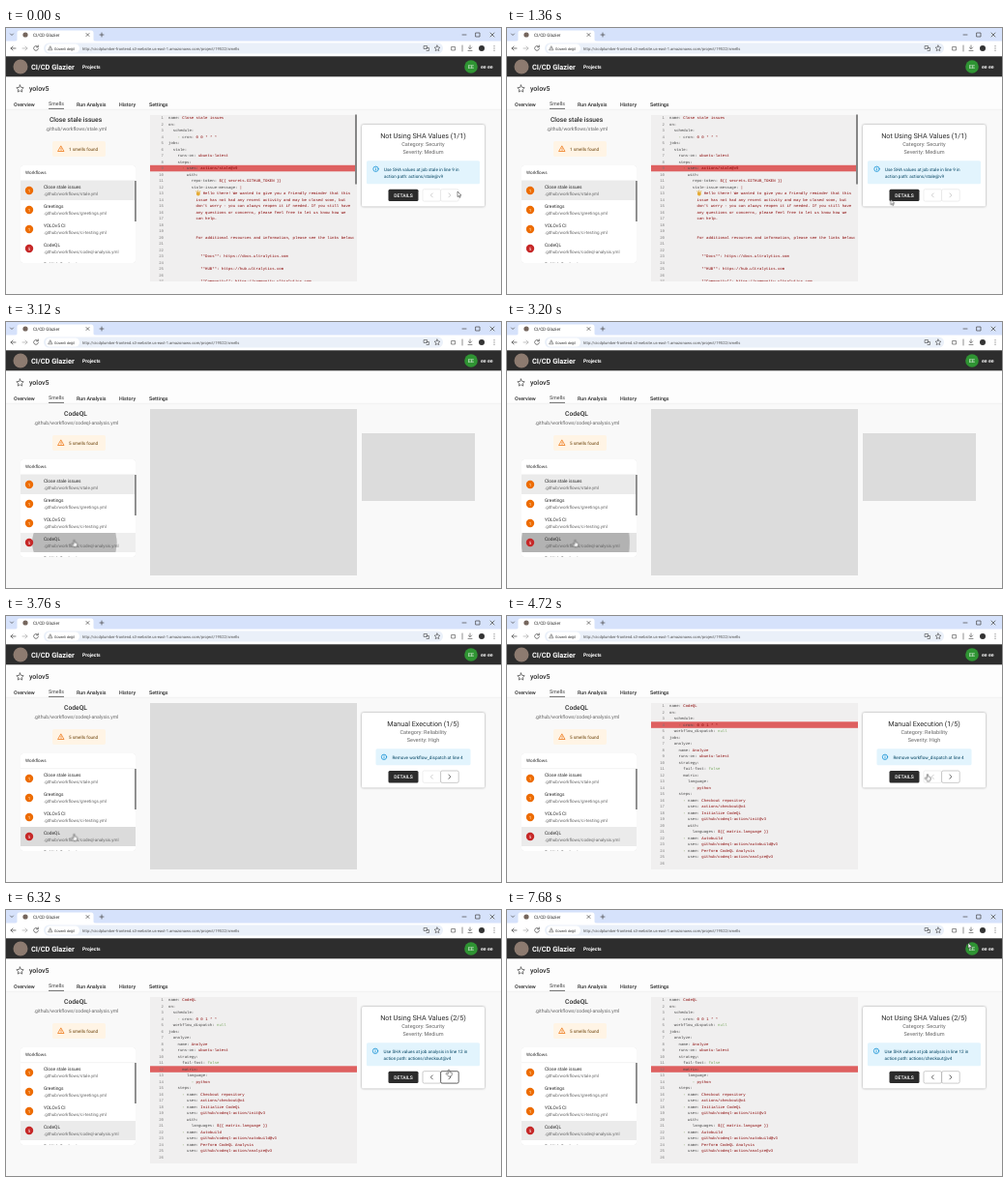
Animation, 512 px wide and 275 px high, one loop 7760 ms. Source, as an HTML page:

```html
<!DOCTYPE html>
<html lang="en">
<head>
<meta charset="utf-8">
<title>Workflow smells</title>
<style>
html, body { margin: 0; width: 100%; height: 100%; overflow: hidden; background: #f9f9f9; }
svg { display: block; width: 100vw; height: 100vh; }
text { font: 4.6px Roboto, "Open Sans", sans-serif; fill: #2b2b2b; white-space: pre; text-rendering: geometricPrecision; }
.mid { text-anchor: middle; }
.bold { font-weight: 500; }
.white { fill: #fff; }
.grey { fill: #666; }
.amber { fill: #663c00; }
.navy { fill: #014361; }
.line { fill: none; stroke: #444; stroke-width: .7; stroke-linecap: round; stroke-linejoin: round; }
.code text { font: 3.97px "Liberation Mono", "DejaVu Sans Mono", monospace; fill: #444; }
.code .num { fill: #777; text-anchor: end; }
.code .val { fill: #800; }
.code .lit { fill: #78a960; }
.code .dash { fill: #397300; }
.shadow { filter: drop-shadow(0 .8px .9px #0006); }

.cut { animation: 7.76s step-end infinite; }
.old { animation-name: old; }
.new { animation-name: new; }
.wait-card { animation-name: wait-card; }
.wait-code { animation-name: wait-code; }
.code-b { animation-name: code-b; }
.first { animation-name: first; }
.first-line { animation-name: first-line; }
.second { animation-name: second; }
.over3 { animation-name: over3; }
.over4 { animation-name: over4; }
.over-next { animation-name: over-next; }
.hand { animation-name: hand; }
.arrow { animation-name: arrow; }
@keyframes old { 0% { opacity: 1 } 40.1%, 100% { opacity: 0 } }
@keyframes new { 0% { opacity: 0 } 40.1%, 100% { opacity: 1 } }
@keyframes wait-card { 0% { opacity: 0 } 40.1% { opacity: 1 } 46.4%, 100% { opacity: 0 } }
@keyframes wait-code { 0% { opacity: 0 } 40.1% { opacity: 1 } 50.5%, 100% { opacity: 0 } }
@keyframes code-b { 0% { opacity: 0 } 50.5%, 100% { opacity: 1 } }
@keyframes first { 0% { opacity: 0 } 46.4% { opacity: 1 } 77.3%, 100% { opacity: 0 } }
@keyframes first-line { 0% { opacity: 0 } 50.5% { opacity: 1 } 77.3%, 100% { opacity: 0 } }
@keyframes second { 0% { opacity: 0 } 77.3%, 100% { opacity: 1 } }
@keyframes over3 { 0% { opacity: 0 } 28% { opacity: 1 } 32%, 100% { opacity: 0 } }
@keyframes over4 { 0% { opacity: 0 } 32% { opacity: 1 } 51.5%, 100% { opacity: 0 } }
@keyframes over-next { 0% { opacity: 0 } 70% { opacity: 1 } 85%, 100% { opacity: 0 } }
@keyframes hand { 0% { opacity: 0 } 28% { opacity: 1 } 51.5% { opacity: 0 } 58.8% { opacity: 1 } 85%, 100% { opacity: 0 } }
@keyframes arrow { 0% { opacity: 1 } 28% { opacity: 0 } 51.5% { opacity: 1 } 58.8% { opacity: 0 } 85%, 100% { opacity: 1 } }

.pointer { animation: travel 7.76s ease-in-out infinite; }
@keyframes travel {
  0%, 12% { transform: translate(467px, 169px) }
  30.9% { transform: translate(74px, 214.5px) }
  35%, 51% { transform: translate(70.5px, 225.5px) }
  59.8%, 66% { transform: translate(435px, 163.5px) }
  72%, 84% { transform: translate(458px, 165px) }
  95%, 100% { transform: translate(477px, 34px) }
}
.ripple { animation: ripple 7.76s linear infinite; transform-origin: 71px 228px; }
@keyframes ripple {
  0%, 37% { transform: scale(0); opacity: 0 }
  37.1% { transform: scale(.1); opacity: .22 }
  41.24% { transform: scale(1); opacity: .22 }
  42.5% { transform: scale(1.14); opacity: .18 }
  46%, 100% { transform: scale(1.14); opacity: 0 }
}
.leave { animation: leave 7.76s linear infinite; }
.enter { animation: enter 7.76s linear infinite; }
@keyframes leave { 0%, 41.3% { opacity: 1 } 43.3%, 100% { opacity: 0 } }
@keyframes enter { 0%, 40.2% { opacity: 0 } 42.2%, 100% { opacity: 1 } }
</style>
</head>
<body>
<svg viewBox="0 0 512 275" preserveAspectRatio="none">
  <defs>
    <clipPath id="list"><rect x="15" y="158" width="119" height="85"/></clipPath>
    <clipPath id="row4"><rect x="15" y="218" width="119" height="20"/></clipPath>
    <clipPath id="panel"><rect x="149" y="90" width="214" height="172"/></clipPath>
  </defs>

  <!-- browser -->
  <rect width="512" height="14" fill="#d6e2fb"/>
  <path d="M9 14q2.500 0 2.500-2.500V5q0-2.500 2.500-2.500h74q2.500 0 2.500 2.500v6.500q0 2.500 2.500 2.500z" fill="#fff"/>
  <path class="line" d="M4.500 6l1.500 1.500 1.500-1.500M83 5.500l3 3m0-3l-3 3M97 7h4m-2-2v4M472 7h4M486 5h4v4h-4zM501 5l4 4m0-4l-4 4"/>
  <circle cx="20" cy="7" r="2.6" fill="#75665d"/>
  <text x="28" y="8.800">CI/CD Glazier</text>
  <rect y="13.500" width="512" height="16" fill="#fff"/>
  <rect x="39" y="15.500" width="413" height="11" rx="5.500" fill="#eaf0f9"/>
  <rect x="41" y="16.500" width="35" height="9" rx="4.500" fill="#fff"/>
  <path class="line" d="M10 21H5m2-2l-2 2 2 2"/>
  <path class="line" d="M17 21h5m-2-2l2 2-2 2" style="stroke:#aaa"/>
  <path class="line" d="M33 19.500a2.400 2.400 0 1 0 .4 2M33.300 18v1.800h-1.800"/>
  <path class="line" d="M46 19l2 3.800h-4zM46 20.400v1.200" style="stroke-width:.5"/>
  <text x="50" y="22.500" style="font-size:3.7px">Güvenli değil</text>
  <text x="79" y="22.600" style="font-size:4.1px;fill:#505050">http://cicdplumber-frontend.s3-website.us-east-1.amazonaws.com/project/19522/smells</text>
  <path class="line" d="M432.500 18.500h3v3h-3zM435 20.500h2.500v3H435M446 18l.9 1.900 2 .3-1.500 1.400.4 2-1.800-1-1.800 1 .4-2-1.500-1.400 2-.3zM461 19.500h3.500v3.500H461zM472 18v6M480 18v3.500m-1.700-1.500l1.700 1.700 1.700-1.700M478 23.500h4" style="stroke-width:.6"/>
  <circle cx="492" cy="21" r="3" fill="#333"/>
  <path class="line" d="M505 18.800v.01m0 2.200v.01m0 2.200v.01" style="stroke-width:1"/>

  <!-- project header -->
  <rect y="50" width="512" height="34.500" fill="#fdfdfd"/>
  <path class="line" d="M14.500 59l1.100 2.400 2.600.3-1.900 1.800.5 2.600-2.300-1.300-2.300 1.300.5-2.600-1.900-1.800 2.600-.3z"/>
  <text x="24" y="65" class="bold" style="font-size:7px">yolov5</text>
  <g id="tabs"></g>
  <path d="M0 84.300h512" stroke="#e4e4e4" stroke-width=".5"/>
  <path d="M44 83.500h16" stroke="#555" stroke-width=".8"/>

  <!-- app header -->
  <rect y="29.300" width="512" height="21" fill="#2d2d2d"/>
  <circle cx="15" cy="40" r="7.500" fill="#8d7b70"/>
  <text x="26" y="42.600" class="white" style="font-size:7.4px;font-weight:700">CI/CD Glazier</text>
  <text x="79" y="42" class="white" style="font-size:5px;font-weight:700">Projects</text>
  <circle cx="481" cy="40" r="6.800" fill="#2f9433"/>
  <text x="481" y="41.900" class="mid white" style="font-size:5.4px">EE</text>
  <text x="491" y="42" class="white bold" style="font-size:5.3px">ee ee</text>

  <!-- left column -->
  <g id="heads"></g>
  <rect x="48" y="117" width="55" height="16" rx="2" fill="#fff4e5"/>
  <path class="line" d="M57 122.200l3 5.300h-6zM57 124.200v1.300m0 1v.01" style="stroke:#ed6c02"/>
  <text x="65" y="126.700" class="cut old amber">1 smells found</text>
  <text x="65" y="126.700" class="cut new amber">5 smells found</text>
  <rect x="15" y="142" width="119" height="101" rx="3" fill="#fff" style="filter:drop-shadow(0 .4px .6px #0002)"/>
  <text x="20" y="151">Workflows</text>
  <path d="M15 157.700h119" stroke="#e6e6e6" stroke-width=".5"/>
  <g clip-path="url(#list)">
    <rect class="leave" x="15" y="158" width="119" height="20" fill="#ebebeb"/>
    <rect class="cut over3" x="15" y="198" width="119" height="20" fill="#f4f4f4"/>
    <rect class="enter" x="15" y="218" width="119" height="20" fill="#ebebeb"/>
    <rect class="cut over4" x="15" y="218" width="119" height="20" fill="#0001"/>
    <g clip-path="url(#row4)"><circle class="ripple" cx="71" cy="228" r="56"/></g>
    <g id="rows"></g>
  </g>
  <rect x="133" y="158" width="1.800" height="42" fill="#858585"/>

  <!-- code -->
  <g clip-path="url(#panel)">
    <rect x="149" y="90" width="214" height="172" fill="#f0efef"/>
    <g class="code cut old" id="stale"></g>
    <g class="code cut code-b" id="codeql"></g>
  </g>
  <rect class="cut old" x="361" y="89.500" width="2" height="72" fill="#858585"/>
  <rect class="cut wait-code" x="149" y="90" width="214" height="172" fill="#dcdcdc"/>

  <!-- smell cards -->
  <g id="cards"></g>
  <rect class="cut wait-card" x="368" y="115" width="117" height="70" fill="#dcdcdc"/>

  <g class="pointer" stroke="#222" stroke-width=".5" stroke-linejoin="round" fill="#fff">
    <path class="cut arrow" d="M0 0v5.600l1.300-1.200.9 2 .9-.4-.9-1.900h1.800z"/>
    <path class="cut hand" d="M-.7.6a.7.7 0 0 1 1.400 0V2.600l2 .5q.8.200.7 1l-.4 2q-.2.900-1 .900h-2q-.6 0-1-.5l-2-2.300q.4-.9 1.200-.3l1.100.7z"/>
  </g>
</svg>

<script>
const $ = id => document.getElementById(id);
const add = (id, markup) => $(id).insertAdjacentHTML('beforeend', markup);
const text = (x, y, s, cls = '', size = 4.6) =>
  `<text x="${x}" y="${y}" class="${cls}" style="font-size:${size}px">${s}</text>`;

const tabs = { Overview: 8, Smells: 44, 'Run Analysis': 73, History: 117, Settings: 148 };
for (const [name, x] of Object.entries(tabs)) {
  const active = name === 'Smells';
  add('tabs', text(x, active ? 80 : 81, name, active ? 'bold grey' : 'bold', 5.3));
}

const head = (cls, name, file) => add('heads', `<g class="cut ${cls}">
  ${text(72, 97.2, name, 'mid bold', 6.7)}
  ${text(72.5, 106, '.github/workflows/' + file, 'mid grey', 5.1)}</g>`);
head('old', 'Close stale issues', 'stale.yml');
head('new', 'CodeQL', 'codeql-analysis.yml');

[['Close stale issues', 'stale', 1], ['Greetings', 'greetings', 1], ['YOLOv5 CI', 'ci-testing', 1],
 ['CodeQL', 'codeql-analysis', 5], ['Publish Docker Images', 'docker', 1]].forEach(([name, file, n], i) => {
  const y = 158 + 20 * i;
  add('rows', `<circle cx="24" cy="${y + 10}" r="4.2" fill="${n > 1 ? '#c62828' : '#ed6c02'}"/>`
    + text(24, y + 11.6, n, 'mid white', 4.4)
    + text(39, y + 8, name, '', 4.8)
    + text(39, y + 14.6, `.github/workflows/${file}.yml`, 'grey', 4.5));
});

// YAML colouring: bullet, key, value
const span = (cls, s) => s ? `<tspan class="${cls}">${s}</tspan>` : '';
const paint = s => {
  const [, pad, dash, key, val] = s.match(/^( *)(- )?([\w-]+:(?= |$))?(.*)$/);
  return pad + span('dash', dash) + (key || '') + span(/null|false/.test(val) ? 'lit' : 'val', val);
};
const rowTop = row => 89.8 + 6.5 * (row - 1);
const mark = (id, row, cls = '') => add(id,
  `<rect class="${cls}" x="149" y="${rowTop(row)}" width="214" height="6.5" fill="#de6060"/>`);
const listing = (id, source) => source.split('\n').forEach((s, i) => {
  const y = rowTop(i + 1) + 4.5;
  add(id, `<text class="num" x="163" y="${y}">${i + 1}</text><text x="168" y="${y}">${paint(s)}</text>`);
});

mark('stale', 9);
listing('stale', `name: Close stale issues
on:
  schedule:
    - cron: 0 0 * * *
jobs:
  stale:
    runs-on: ubuntu-latest
    steps:
      - uses: actions/stale@v9
        with:
          repo-token: \${{ secrets.GITHUB_TOKEN }}
          stale-issue-message: |
               Hello there! We wanted to give you a friendly reminder that this
            issue has not had any recent activity and may be closed soon, but
            don't worry - you can always reopen it if needed. If you still have
            any questions or concerns, please feel free to let us know how we
            can help.


            For additional resources and information, please see the links below:


              **Docs**: https://docs.ultralytics.com

              **HUB**: https://hub.ultralytics.com

              **Community**: https://community.ultralytics.com`);
// waving hand before the greeting
add('stale', `<circle cx="198.8" cy="171.5" r="1.9" fill="#e5ab35"/>
  <path d="M197.700 171l-.8-2.300m1.800 1.800v-2.600m1.100 2.800l.9-2" stroke="#e5ab35" stroke-width=".8" stroke-linecap="round"/>`);

mark('codeql', 4, 'cut first-line');
mark('codeql', 12, 'cut second');
listing('codeql', `name: CodeQL
on:
  schedule:
    - cron: 0 0 1 * *
  workflow_dispatch: null
jobs:
  analyze:
    name: Analyze
    runs-on: ubuntu-latest
    strategy:
      fail-fast: false
      matrix:
        language:
          - python
    steps:
      - name: Checkout repository
        uses: actions/checkout@v4
      - name: Initialize CodeQL
        uses: github/codeql-action/init@v3
        with:
          languages: \${{ matrix.language }}
      - name: Autobuild
        uses: github/codeql-action/autobuild@v3
      - name: Perform CodeQL Analysis
        uses: github/codeql-action/analyze@v3
`);

const outline = (x, y, color, cls = '') =>
  `<rect class="${cls}" x="${x}" y="${y}" width="18.6" height="12.4" rx="1.5" fill="none" stroke="${color}" stroke-width=".6"/>`;
const arrowButton = (x, y, dir, on) => outline(x, y, on ? '#aaa' : '#e2e2e2')
  + `<path class="line" d="M${x + 9.3 - dir} ${y + 4.2}l${2 * dir} 2 ${-2 * dir} 2" style="stroke:${on ? '#222' : '#bbb'}"/>`;

function card({ cls, title, kind, level, tip, left, box, prev, next }) {
  const two = tip.length > 1;
  const end = two ? 184.6 : 177.5;
  const by = two ? 166.7 : 160;
  add('cards', `<g class="cut ${cls}">
    <rect class="shadow" x="368" y="100" width="127" height="${end - 100}" rx="1.5" fill="#fff"/>
    ${text(431.5, 113.6, title, 'mid', 7.2)}
    ${text(431.5, 121.8, 'Category: ' + kind, 'mid grey', 5.5)}
    ${text(431.5, 130.2, 'Severity: ' + level, 'mid grey', 5.5)}
    <rect x="${box[0]}" y="137.3" width="${box[1]}" height="${two ? 24 : 17}" rx="1.5" fill="#e2f4fd"/>
    <circle class="line" cx="${left - 8.5}" cy="145.8" r="2.7" style="stroke:#0288d1"/>
    <path class="line" d="M${left - 8.5} 145.6v1.500m0-2.900v.01" style="stroke:#0288d1"/>
    ${tip.map((s, i) => text(left, 147.6 + 7.4 * i, s, 'navy', 4.6)).join('')}
    <rect x="395.5" y="${by}" width="31" height="12.4" rx="1.5" fill="#2b2b2b"/>
    ${text(411, by + 7.9, 'DETAILS', 'mid white bold', 5)}
    ${arrowButton(431, by, -1, prev)}${arrowButton(449.6, by, 1, next)}
    ${next ? outline(449.6, by, '#333', 'cut over-next') : ''}
  </g>`);
}
card({ cls: 'old', title: 'Not Using SHA Values (1/1)', kind: 'Security', level: 'Medium', left: 391, box: [373, 117],
  tip: ['Use SHA values at job stale in line 9 in', 'action path: actions/stale@v9'] });
card({ cls: 'first', title: 'Manual Execution (1/5)', kind: 'Reliability', level: 'High', left: 399.5, box: [382.5, 98],
  tip: ['Remove workflow_dispatch at line 4'], next: true });
card({ cls: 'second', title: 'Not Using SHA Values (2/5)', kind: 'Security', level: 'Medium', left: 390.5, box: [373, 117],
  tip: ['Use SHA values at job analysis in line 12 in', 'action path: actions/checkout@v4'], prev: true, next: true });
</script>
</body>
</html>
```
